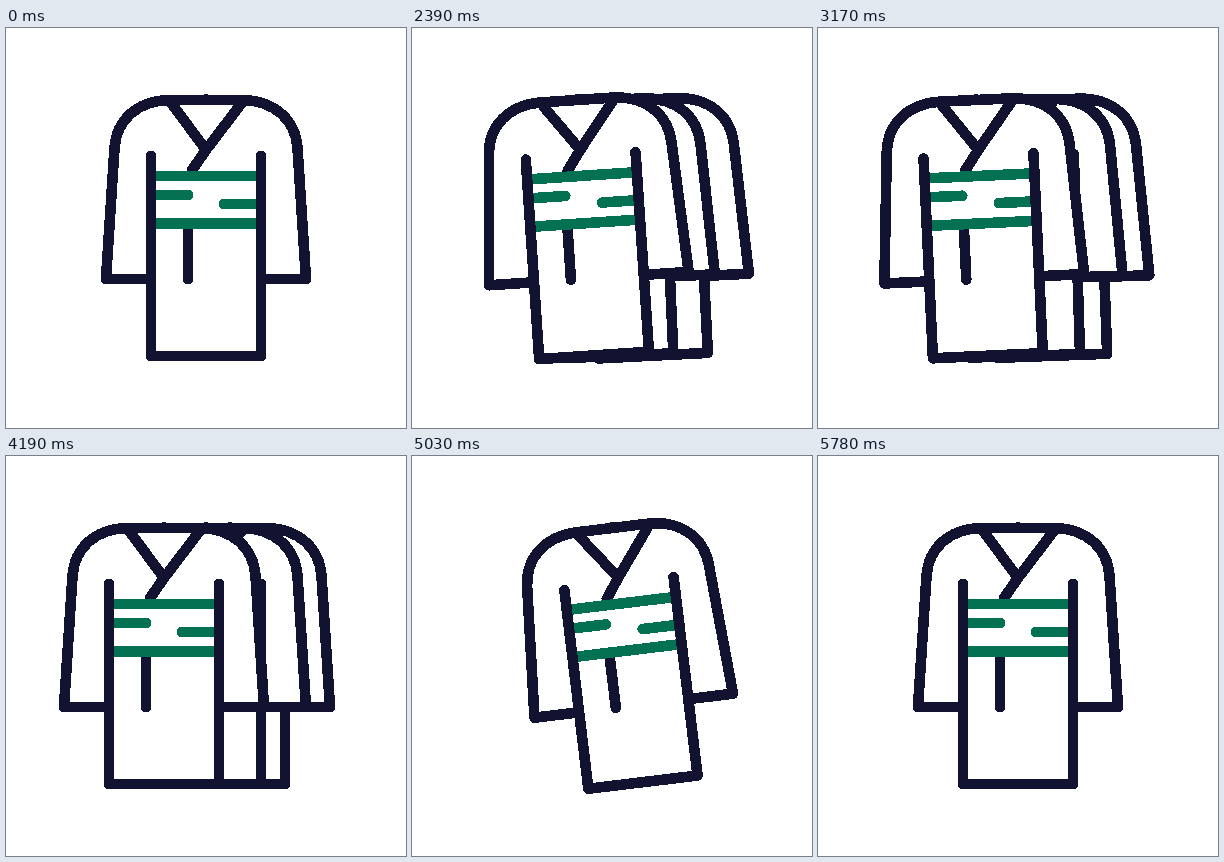
Recreate the animation shown at these times as an HTML page. Size 400 px wide and 400 px high, loop 5840 ms.

```html
<!DOCTYPE html>
<html>
<head>
<meta charset="utf-8">
<style>
html, body { margin: 0; width: 100%; height: 100%; overflow: hidden; background: #fff; }
svg { display: block; width: 100%; height: 100%; }
</style>
</head>
<body>
<svg viewBox="0 0 400 400" shape-rendering="crispEdges">
  <defs>
    <path id="coat" d="M145 251H100L108.500 120C110.500 92 131 73 163 72H237C269 73 289.500 92 291.500 120L300 251H255"/>
    <g id="robe" fill="none" stroke="#121331" stroke-width="10.6" stroke-linecap="round" stroke-linejoin="round">
      <use href="#coat" fill="#fff" stroke="none"/>
      <path d="M145 251H255V328H145Z" fill="#fff" stroke="none"/>
      <path d="M166 76L200 122M235 76L200 122L186 142M182 200V251"/>
      <g stroke="#057153">
        <path stroke-linecap="butt" d="M147 148H253M147 195.500H253"/>
        <path d="M148 167H182M252 176H218"/>
      </g>
      <use href="#coat"/>
      <path d="M145 128V328H255V128"/>
      <circle cx="200" cy="69" r="3" fill="#121331" stroke="none"/>
    </g>
  </defs>
  <use id="back" href="#robe"/>
  <use id="middle" href="#robe"/>
  <use id="front" href="#robe"/>
</svg>
<script>
const LOOP = 5840, STEP = 30;
const OPEN = 2000, OPEN_TIME = 1680;
const CLOSE = 4190, CLOSE_TIME = 1590, MERGE = 840;

// x: fanned-out offset, sway: passing drift, swing and period: opening swing,
// lag: extra tilt while closing, out and home: [delay, duration] of the slides.
const robes = {
  back:   { x: 24,  sway: 6,    swing: 7,  period: 660, lag: -26.5, out: [0, 200],  home: [430, 300] },
  middle: { x: 0,   sway: -8,   swing: -6, period: 960, lag: -13.8, out: [0, 200],  home: [330, 510] },
  front:  { x: -42, sway: -1.5, swing: -9, period: 960, lag: 0,     out: [60, 460], home: [330, 510] }
};

const clamp = v => Math.max(0, Math.min(1, v));
const ease = (s, [delay, time]) => (1 - Math.cos(Math.PI * clamp((s - delay) / time))) / 2;
const wave = (s, period) => Math.sin(2 * Math.PI * s / period) * clamp(s / 150);

function opening(r, s) {
  const drift = Math.sin(Math.PI * clamp(s / 1320)) ** 2;
  return {
    x: r.x * ease(s, r.out) + r.sway * drift,
    turn: r.swing * wave(s, r.period) * (1 - clamp(s / OPEN_TIME))
  };
}

function closing(r, s) {
  const p = clamp(s / MERGE);
  return {
    x: r.x * (1 - ease(s, r.home)),
    turn: 7.5 * wave(s, 1140) * (1 - clamp(s / CLOSE_TIME) ** 4)
      + r.lag * Math.sin(Math.PI * p) * (1 - p)
  };
}

function draw(now) {
  // Poses hold for one step, on a grid that includes both starts.
  const t = Math.floor((now % LOOP + 10) / STEP) * STEP - 10;
  const apart = t > OPEN && t < CLOSE + MERGE;
  for (const id in robes) {
    const { x, turn } = t < CLOSE ? opening(robes[id], t - OPEN) : closing(robes[id], t - CLOSE);
    const node = document.getElementById(id);
    node.setAttribute('transform', `translate(${x}) rotate(${turn} 200 70)`);
    node.style.display = apart || id === 'front' ? '' : 'none';
  }
}

const start = performance.now();
function tick() {
  draw(performance.now() - start);
  requestAnimationFrame(tick);
}
tick();
</script>
</body>
</html>
```
